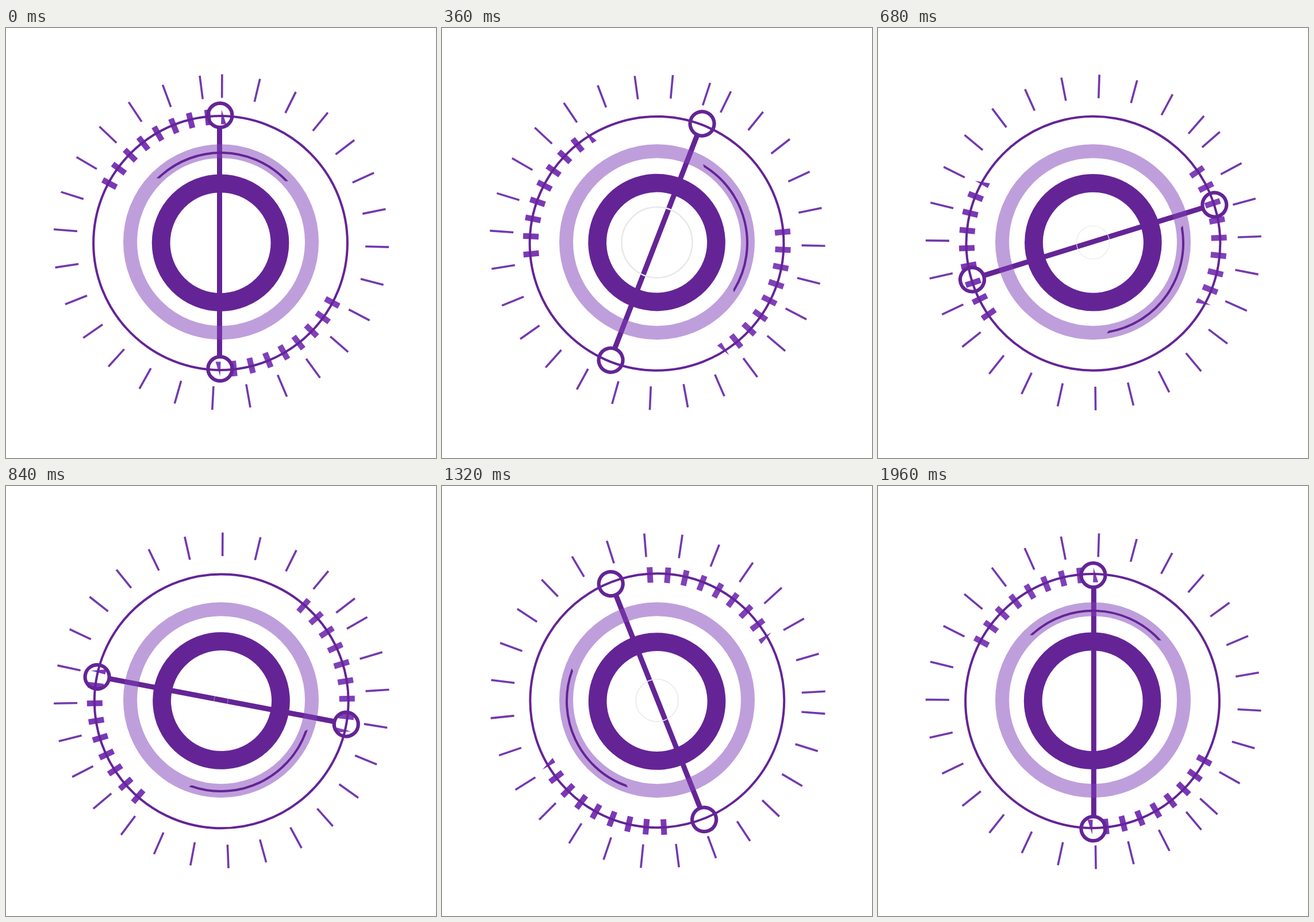
These frames come from a looping animation (748x748 px, 2 s). An HTML page:

```html
<!DOCTYPE html>
<html lang="en">
<head>
<meta charset="utf-8">
<title>Rotating dial</title>
<style>
  html, body { margin: 0; width: 100%; height: 100%; overflow: hidden; background: #fff; }
  svg { display: block; width: 100%; height: 100%; }
</style>
</head>
<body>
<svg viewBox="0 0 748 748" fill="none" stroke="#642496">
  <defs>
    <clipPath id="cap"><rect x="-170" y="-170" width="340" height="60"/></clipPath>
  </defs>
  <g id="rays" stroke="#7339ae" stroke-width="3.6"></g>
  <g id="teeth" stroke="none" fill="#7630b4"></g>
  <circle id="orbit" r="220.9" stroke-width="4"/>
  <g id="hand">
    <path d="M-0.9 -198V198" stroke-width="9"/>
    <circle cy="-220.5" r="21" stroke-width="6.2"/>
    <circle cy="220.5" r="21" stroke-width="6.2"/>
  </g>
  <circle id="pulse" cx="374" cy="373" stroke="#e8e8e8"/>
  <circle id="ring" r="103.4" stroke-width="31.8"/>
  <circle cx="374" cy="372.2" r="158" stroke="#8040b8" stroke-opacity=".5" stroke-width="24"/>
  <g id="arc"><circle r="157" stroke-width="4" clip-path="url(#cap)"/></g>
</svg>
<script>
const FRAME = 40, COUNT = 50;
const SVG = 'http://www.w3.org/2000/svg';
const el = id => document.getElementById(id);

function add(parent, tag, attrs) {
  const node = document.createElementNS(SVG, tag);
  for (const key in attrs) node.setAttribute(key, attrs[key]);
  parent.appendChild(node);
  return node;
}

// Rotate about a pivot, with the part sitting slightly off it
function spin(id, x, y, angle, dx = 0, dy = 0) {
  el(id).setAttribute('transform', `translate(${x} ${y}) rotate(${angle}) translate(${dx} ${dy})`);
}

// Cubic ease with control points (x1, 0) and (x2, 1)
function ease(x, x1 = 0.333, x2 = 0.39) {
  let low = 0, high = 1;
  for (let i = 0; i < 30; i++) {
    const s = (low + high) / 2, r = 1 - s;
    if (3 * x1 * s * r * r + 3 * x2 * s * s * r + s * s * s < x) low = s;
    else high = s;
  }
  return low * low * (3 - 2 * low);
}

// [step, degrees]
const ARC_KEYS = [[0, 1.3], [9, 76.5], [17, 125.1], [25, 183.7], [33, 244.8], [41, 297.8], [49, 362.3]];

function arcAngle(n) {
  const i = Math.max(1, ARC_KEYS.findIndex(key => key[0] >= n));
  const [n0, a0] = ARC_KEYS[i - 1], [n1, a1] = ARC_KEYS[i];
  return a0 + (a1 - a0) * (n - n0) / (n1 - n0);
}

for (let i = 0; i < 28; i++) {
  add(el('rays'), 'path', { d: 'M0 -251V-292', transform: `rotate(${0.33 + i * 13.05})` });
}

for (const [turn, opacity] of [[0, 0.96], [180, 0.92]]) {
  const group = add(el('teeth'), 'g', { transform: `rotate(${turn})`, opacity });
  for (let i = 0; i < 8; i++) {
    add(group, 'rect', { x: -5, y: -233, width: 10, height: 27, transform: `rotate(${-61.9 + i * 8})` });
  }
  add(group, 'path', { d: 'M1.2 -232L0.3 -206.5H9.3Z' });
}

function draw(time) {
  const n = Math.floor(time / FRAME) % COUNT;
  const p = n / (COUNT - 1);
  const radius = 4.1 * Math.abs(n - 24);
  spin('rays', 374.2, 373.6, 139.7 * p, 0, -1);
  spin('teeth', 373.8, 374, -180 * p);
  spin('orbit', 373.9, 374, -360 * p, -0.9, 0);
  spin('hand', 373.4, 374, 180 * ease(p), -1, -1.6);
  spin('ring', 373.8, 373.8, 360 * p, -0.75, -0.1);
  spin('arc', 374, 374, arcAngle(n));
  el('pulse').setAttribute('r', radius);
  el('pulse').setAttribute('stroke-width', radius * 0.04);
}

const start = performance.now();
function tick() {
  draw(performance.now() - start);
  requestAnimationFrame(tick);
}
tick();
</script>
</body>
</html>
```
